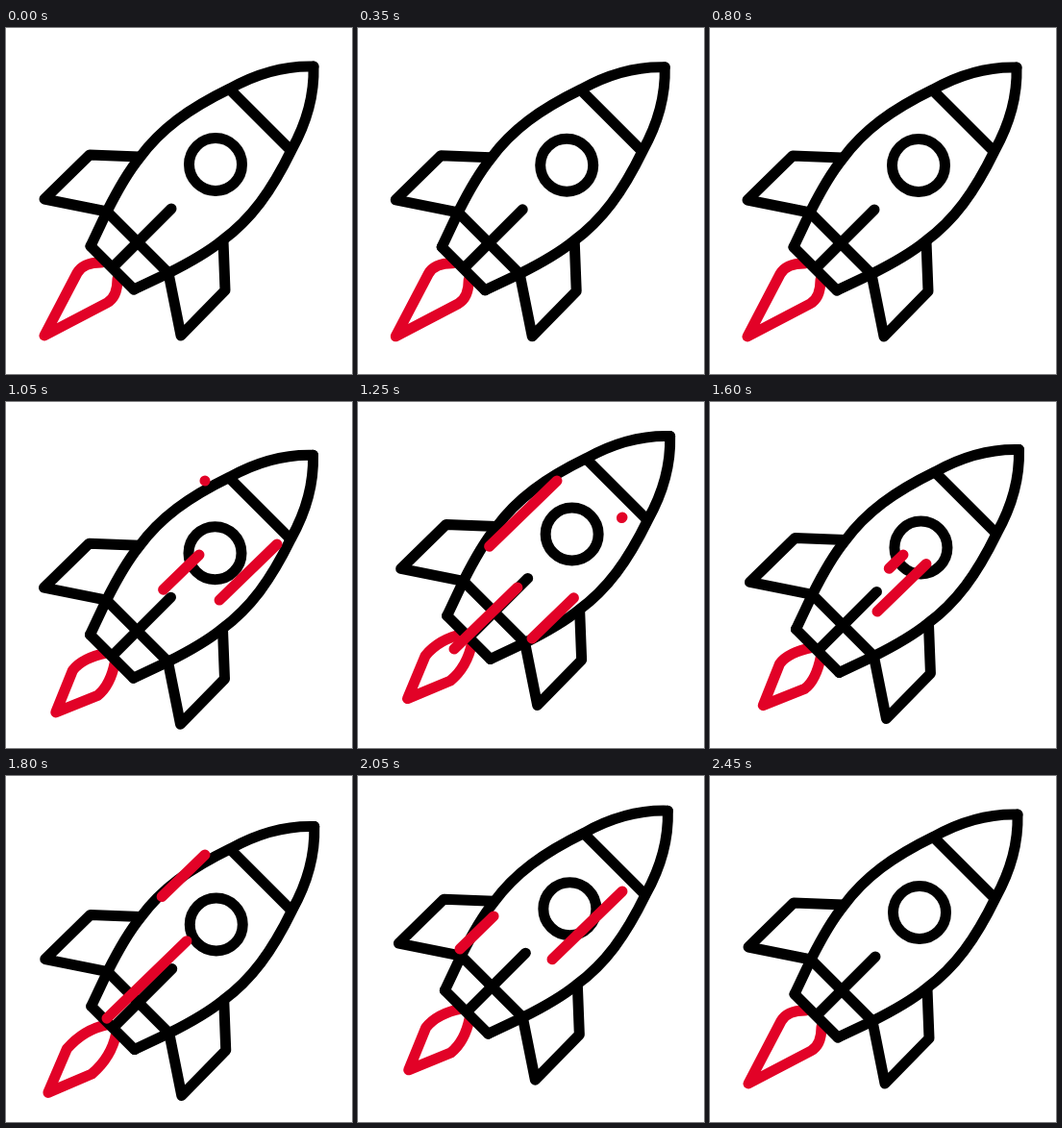
An HTML page with a canvas for the animation above (2500 ms loop, 360x360 px).

```html
<!DOCTYPE html>
<html lang="en">
<head>
<meta charset="utf-8">
<title>Rocket</title>
<style>
html, body { margin: 0; width: 100%; height: 100%; overflow: hidden; background: #fff; }
canvas { display: block; width: 360px; height: 360px; }
</style>
</head>
<body>
<canvas id="stage" width="360" height="360"></canvas>
<script>
const ctx = document.getElementById('stage').getContext('2d');
const LOOP = 2500, STEP = 50;
const RED = '#e20227';

const STREAK_LENGTH = 101, GROW_TIME = 320, TAIL_DELAY = 205, REPEAT = 605;
// each lane is the diagonal x + y = sum
const lanes = [
  { x: 207, sum: 289, start: 1047, runs: 2 },
  { x: 201, sum: 360, start: 918, runs: 2 },
  { x: 275, sum: 395, start: 1236, runs: 2 },
  { x: 282, sum: 430, start: 870, runs: 1 }
];

const smooth = p => {
  p = Math.min(1, Math.max(0, p));
  return p * p * (3 - 2 * p);
};
const ramp = (t, from, to) => smooth((t - from) / (to - from));
const wave = (t, peak, period) => Math.cos((t - peak) / period * Math.PI * 2);
const mix = (a, b, p) => a + (b - a) * p;
// reflection in the rocket's long axis
const mirror = ([x, y]) => [360 - y, 360 - x];

function rocketOffset(t) {
  const power = ramp(t, 800, 950) - ramp(t, 1960, 2120);
  const swing = wave(t, 1718, 720);
  const drift = ramp(t, 0, 500) - ramp(t, 1000, 1200);
  const along = -7.8 * swing * power - drift;
  const across = 4.9 * (swing + 0.6) * power;
  return [across + along, across - along];
}

function line(...points) {
  ctx.beginPath();
  points.forEach(p => ctx.lineTo(...p));
  ctx.stroke();
}

function drawFlame(t) {
  const power = ramp(t, 800, 950) - ramp(t, 2000, 2150);
  const pull = power * (8.5 + 5.5 * wave(t, 1580, 470));
  const sharp = Math.min(1, power * 1.4);
  const blend = (a, b) => a.map((v, i) => mix(v, b[i], sharp));
  const side = blend([74, 255], [60 + 0.8 * pull, 274 - 0.8 * pull]);
  const bend = blend([80, 244], [80, 251]);
  const end = blend([99, 244], [105, 246]);
  ctx.strokeStyle = RED;
  ctx.beginPath();
  ctx.moveTo(...end);
  ctx.quadraticCurveTo(...bend, ...side);
  ctx.lineTo(40 + pull, 320 - pull);
  ctx.lineTo(...mirror(side));
  ctx.quadraticCurveTo(...mirror(bend), ...mirror(end));
  ctx.stroke();
}

function drawHalf(map) {
  const curve = (...points) => ctx.bezierCurveTo(...points.flatMap(map));
  ctx.beginPath();
  ctx.moveTo(320, 40);
  curve([286, 39], [258, 49], [233, 63]);
  curve([190, 84], [161, 105], [139, 135]);
  curve([126, 151], [115, 171], [105, 191]);
  ctx.lineTo(...map([88, 227]));
  ctx.stroke();
  line(...[[139, 134], [87, 132], [40, 178], [105, 191]].map(map));
}

function drawBody() {
  ctx.strokeStyle = '#000';
  drawHalf(p => p);
  drawHalf(mirror);
  line([233, 64], [296, 127]);
  line([105, 191], [169, 255]);
  line([88, 227], [133, 272]);
  line([172, 188], [113, 247]);
  ctx.beginPath();
  ctx.arc(218, 142, 27.5, 0, Math.PI * 2);
  ctx.stroke();
}

function drawStreak({ x, sum }, age) {
  if (age < 0 || age > TAIL_DELAY + GROW_TIME) return;
  const pointAt = time => {
    const d = STREAK_LENGTH * ramp(time, 0, GROW_TIME);
    return [x - d, sum - x + d * 0.97];
  };
  line(pointAt(age - TAIL_DELAY), pointAt(age));
}

function drawStreaks(t) {
  ctx.strokeStyle = RED;
  for (const lane of lanes) {
    for (let run = 0; run < lane.runs; run++) {
      drawStreak(lane, t - lane.start - run * REPEAT);
    }
  }
}

function render(now) {
  const t = Math.floor((now % LOOP) / STEP) * STEP;
  ctx.fillStyle = '#fff';
  ctx.fillRect(0, 0, 360, 360);
  ctx.lineWidth = 11;
  ctx.lineCap = ctx.lineJoin = 'round';
  ctx.save();
  ctx.translate(...rocketOffset(t));
  drawFlame(t);
  drawBody();
  ctx.restore();
  drawStreaks(t);
}

const began = performance.now();
function tick() {
  render(performance.now() - began);
  requestAnimationFrame(tick);
}
tick();
</script>
</body>
</html>
```
